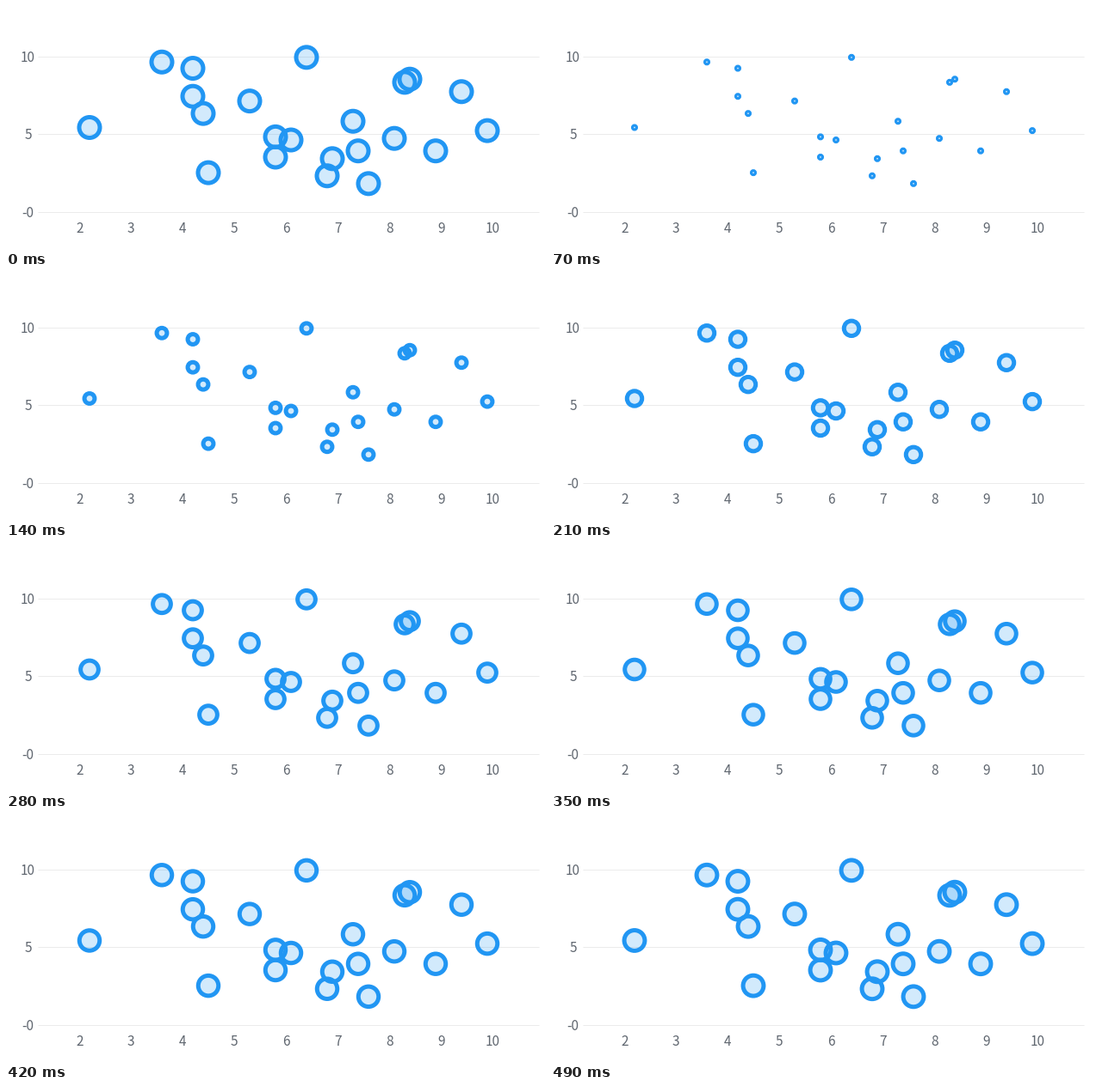
Write a matplotlib script that moves like this. It is 626 px wide and 283 px high and loops after 1690 ms.

```python
import matplotlib.pyplot as plt
from matplotlib.animation import FuncAnimation
from matplotlib.patches import Circle

WIDTH, HEIGHT, DPI = 626, 283, 100
LOOP_MS, TICK_MS, STEP_MS = 1690, 10, 70
LAST_STEP = 7
BLUE, GREY, GRID = "#2196f3", "#606770", "#ebebeb"
RADIUS, STROKE = 12, 5

POINTS = [
    (2.2, 5.4), (4.5, 2.5), (4.2, 7.4), (6.4, 9.9), (4.2, 9.2), (5.8, 3.5),
    (7.3, 5.8), (8.9, 3.9), (6.1, 4.6), (9.4, 7.7), (8.4, 8.5), (3.6, 9.6),
    (4.4, 6.3), (5.8, 4.8), (6.9, 3.4), (7.6, 1.8), (8.3, 8.3), (9.9, 5.2),
    (8.1, 4.7), (7.4, 3.9), (6.8, 2.3), (5.3, 7.1),
]


def to_x(value):
    return 85 + 60 * (value - 2)


def to_y(value):
    return 239.5 - 18.15 * value


def px(size):
    return size * 72 / DPI


def label(x, y, text):
    ax.text(x, y, text, color=GREY, fontsize=px(15.4), ha="center",
            va="center_baseline", family="Noto Sans CJK JP")


def marker_radius(step):
    """Quintic ease-out growth; the first step holds the finished chart."""
    if step == 0:
        return RADIUS
    progress = 0.0264 + 0.1009 * (step - 1)
    return RADIUS * (1 - (1 - progress) ** 5)


fig = plt.figure(figsize=(WIDTH / DPI, HEIGHT / DPI), dpi=DPI, facecolor="white")
ax = fig.add_axes([0, 0, 1, 1])
ax.set(xlim=(0, WIDTH), ylim=(HEIGHT, 0))
ax.axis("off")

for value, text in ((0, "-0"), (5, "5"), (10, "10")):
    y = round(to_y(value) - 0.5) + 0.5
    ax.plot([37, 619], [y, y], color=GRID, lw=px(1), zorder=0,
            solid_capstyle="butt")
    label(25.5, y, text)
for value in range(2, 11):
    label(to_x(value) + 0.2, 257.5, str(value))

fills, rings = [], []
for vx, vy in POINTS:
    center = to_x(vx), to_y(vy)
    fills.append(ax.add_patch(
        Circle(center, RADIUS, fc=BLUE, ec="none", alpha=0.2, zorder=2)))
    rings.append(ax.add_patch(
        Circle(center, RADIUS, fill=False, ec=BLUE, lw=px(STROKE), zorder=3)))


def draw(frame):
    step = min(frame * TICK_MS // STEP_MS, LAST_STEP)
    radius = marker_radius(step)
    for circle in fills + rings:
        circle.set_radius(radius)
    return fills + rings


anim = FuncAnimation(fig, draw, frames=LOOP_MS // TICK_MS, interval=TICK_MS,
                     repeat=True, repeat_delay=0, blit=False)
plt.show()
```
